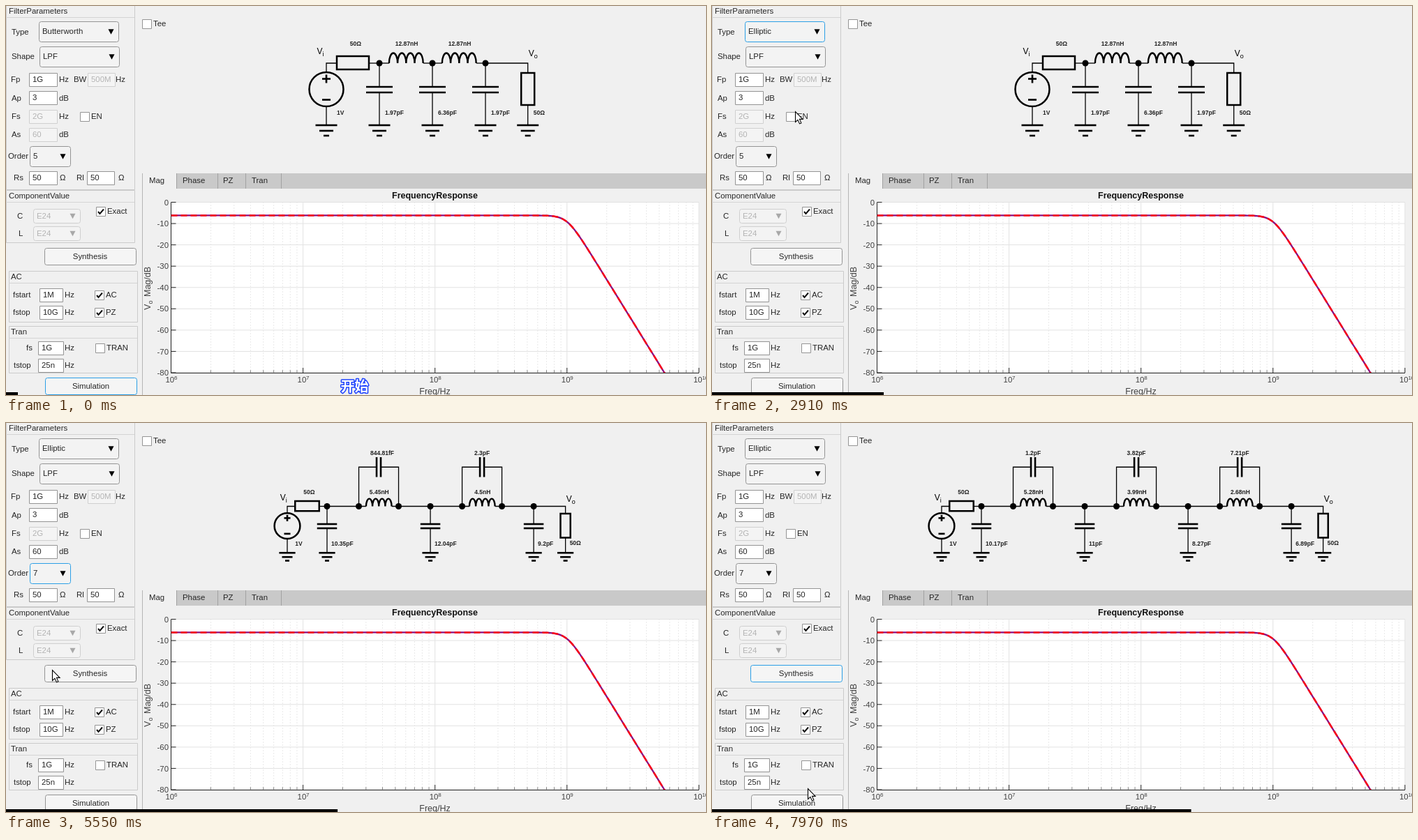
An HTML page with a canvas that plays this animation: 1003x558 px, repeating every 8000 ms.

```html
<!DOCTYPE html>
<html lang="en">
<head>
<meta charset="utf-8">
<title>Filter designer</title>
<style>
html, body { margin: 0; width: 1003px; height: 558px; overflow: hidden; background: #f0f0f0; }
canvas { display: block; }
</style>
</head>
<body>
<canvas id="stage" width="1003" height="558"></canvas>
<script>
const g = document.getElementById('stage').getContext('2d');
const SANS = '"Liberation Sans", Arial, sans-serif';
const INK = '#262626', DIM = '#b4b4b4', EDGE = '#949494', BLUE = '#2b9fe6', PICK = '#a6dbff';
const TYPES = ['Butterworth', 'Chebyshev I', 'Chebyshev II', 'Elliptic', 'Bessel', 'Gaussian', 'LinearPhase'];
const ORDERS = Array.from({ length: 15 }, (_, i) => String(i + 2));

// Pointer way points: step, x, y
const PATH = [[2, 130, 250], [5, 140, 40], [7, 135, 62], [10, 92, 129], [11, 98, 133], [12, 119, 151],
  [16, 85, 198], [19, 78, 214], [21, 67, 328], [24, 62, 352], [25, 66, 354], [29, 129, 365],
  [35, 132, 386], [37, 137, 524]];

function text(s, x, y, { size = 11.4, color = INK, align = 'left', bold = false } = {}) {
  g.font = `${bold ? 'bold ' : ''}${size}px ${SANS}`;
  g.fillStyle = color;
  g.textAlign = align;
  g.textBaseline = 'middle';
  g.fillText(s, x, y);
}

function line(color, width, ...pts) {
  g.strokeStyle = color;
  g.lineWidth = width;
  g.beginPath();
  for (let i = 0; i < pts.length; i += 2) g.lineTo(pts[i], pts[i + 1]);
  g.stroke();
}

function rect(x, y, w, h, fill) {
  g.fillStyle = fill;
  g.fillRect(x, y, w, h);
}

function box(x, y, w, h, { fill = '#fff', stroke = EDGE, radius = 0 } = {}) {
  g.beginPath();
  g.roundRect(x + .5, y + .5, w, h, radius);
  g.fillStyle = fill;
  g.fill();
  g.strokeStyle = stroke;
  g.lineWidth = 1;
  g.stroke();
}

function triangle(x, y, w, h, color) {
  g.fillStyle = color;
  g.beginPath();
  g.moveTo(x - w, y - h);
  g.lineTo(x + w, y - h);
  g.lineTo(x, y + h);
  g.fill();
}

function field(x, y, w, value, off) {
  box(x, y, w, 19, off ? { fill: '#f4f4f4', stroke: '#d0d0d0' } : {});
  text(value, x + 5, y + 10, { color: off ? DIM : INK });
}

function dropdown(x, y, w, h, value, { focus = false, off = false } = {}) {
  box(x, y, w, h, { fill: '#f3f3f3', stroke: off ? '#cfcfcf' : focus ? BLUE : EDGE, radius: 3 });
  text(value, x + 5, y + h / 2 + .5, { color: off ? DIM : INK });
  triangle(x + w - 10.5, y + h / 2 + .5, 4, 3.7, off ? '#a8a8a8' : '#000');
}

function check(x, y, label, on) {
  box(x, y, 13, 13);
  if (on) line('#111', 2, x + 3, y + 7, x + 5.5, y + 10, x + 11, y + 3.5);
  text(label, x + 16, y + 7);
}

function button(x, y, label, focus) {
  box(x, y, 131, 24, { fill: '#f5f5f5', stroke: focus ? BLUE : EDGE, radius: 3 });
  text(label, x + 65.5, y + 12.5, { align: 'center' });
}

function panel(title, x, y, w, h) {
  box(x, y, w, h, { fill: '#f0f0f0', stroke: '#cbcbcb' });
  line('#d4d4d4', 1, x, y + 17.5, x + w, y + 17.5);
  text(title, Math.max(4, x + 3), y + 9);
}

function list(items, x, y, w, h, selected, pointerY) {
  const row = 22.2, hover = Math.floor((pointerY - y - 1) / row);
  box(x, y, w, h, { fill: '#fafafa', stroke: '#a0a0a0' });
  items.forEach((item, i) => {
    const top = y + 1 + i * row;
    if (i === selected) rect(x + 1, top, w - 1, row, PICK);
    if (i === hover) {
      box(x, Math.round(top), w, row - 1, { fill: i === selected ? PICK : '#dbf0ff', stroke: BLUE });
    }
    text(item, x + 5, top + row / 2);
  });
}

function controls(s) {
  panel('FilterParameters', 0, -1, 184, 264);
  panel('ComponentValue', 0, 264, 184, 75);
  panel('AC', 4, 380, 184, 73);
  panel('Tran', 4, 459, 184, 67);
  [['Type', 8, 38], ['Shape', 8, 73], ['Fp', 7, 106], ['Hz', 76, 106], ['BW', 97, 106], ['Hz', 157, 106],
    ['Ap', 8, 133], ['dB', 76, 133], ['Fs', 8, 159], ['Hz', 76, 159], ['As', 8, 185], ['dB', 76, 185],
    ['Order', 3, 216], ['Rs', 11, 247], ['Ω', 77, 247], ['Rl', 101, 247], ['Ω', 161, 247],
    ['C', 16, 302], ['L', 18, 327], ['fstart', 10, 415], ['Hz', 84, 415], ['fstop', 10, 440], ['Hz', 84, 440],
    ['fs', 29, 491], ['Hz', 84, 491], ['tstop', 11, 516], ['Hz', 84, 516]].forEach(a => text(...a));
  dropdown(47, 22, 114, 29, s.type, { focus: s.focus === 'type' });
  dropdown(48, 58, 114, 29, 'LPF');
  dropdown(34, 201, 58, 29, s.order, { focus: s.focus === 'order' });
  dropdown(39, 291, 67, 20, 'E24', { off: true });
  dropdown(39, 316, 67, 20, 'E24', { off: true });
  field(33, 96, 40, '1G');
  field(117, 96, 39, '500M', true);
  field(33, 122, 40, '3');
  field(33, 149, 40, '2G', true);
  field(33, 175, 40, '60', !s.stopband);
  field(33, 237, 40, '50');
  field(116, 237, 39, '50');
  field(48, 405, 33, '1M');
  field(48, 430, 33, '10G');
  field(46, 481, 36, '1G');
  field(46, 506, 36, '25n');
  check(195, 19, 'Tee');
  check(106, 152, 'EN');
  check(129, 288, 'Exact', true);
  check(127, 408, 'AC', true);
  check(127, 433, 'PZ', true);
  check(128, 484, 'TRAN');
  button(55, 347, 'Synthesis', s.focus === 'synthesis');
  button(56, 533, 'Simulation', s.focus === 'simulation');
}

// Ladder filter; each stage is [inductor] or [inductor, parallel capacitor]
function circuit(x0, y0, k, shunts, stages) {
  const LEAD = 60.7, SPAN = 76;
  const X = u => x0 + u * k, Y = v => y0 + v * k;
  const wire = (...p) => stroke(1.3, ...p), bold = (...p) => stroke(2.6, ...p);
  const stroke = (w, ...p) => line('#000', w, ...p.map((v, i) => i % 2 ? Y(v) : X(v)));
  const label = (s, x, y, align = 'left') => text(s, x, y, { size: 8.5, bold: true, color: '#222', align });
  const resistor = (u, v, w, h) => {
    g.lineWidth = 2.5;
    g.strokeRect(X(u), Y(v), w * k, h * k);
  };
  const dot = u => {
    g.fillStyle = '#000';
    g.beginPath();
    g.arc(X(u), y0, 4.5, 0, 7);
    g.fill();
  };
  const ground = u => [[89, 15.5], [97, 10], [104, 4]].forEach(([v, w]) => bold(u - w, v, u + w, v));
  const terminal = (sub, x, y) => {
    text('V', x, y, { size: 12, color: '#000' });
    text(sub, x + 8, y + 4, { size: 9, color: '#000' });
  };
  const coil = u => {
    g.lineWidth = 2.4;
    g.beginPath();
    for (let i = 0; i < 4; i++) g.ellipse(X(u + 6 + 12.2 * i), y0, 6.1 * k, 14.5 * k, 0, Math.PI, 2 * Math.PI);
    g.stroke();
  };

  wire(0, 12, 0, 0, 15, 0);
  wire(61, 0, 76, 0);
  resistor(15, -10, 46, 19);
  g.beginPath();
  g.arc(x0, Y(37.5), 24.5 * k, 0, 7);
  g.stroke();
  bold(-6, 22.5, 6, 22.5);
  bold(0, 16.5, 0, 28.5);
  bold(-6, 52.5, 6, 52.5);
  wire(0, 62, 0, 89);
  ground(0);
  label('1V', X(15), Y(72));
  label('50Ω', X(42), Y(-27), 'center');
  terminal('i', X(-13) - .5, Y(-16));

  let u = 76;
  shunts.forEach((value, i) => {
    dot(u);
    wire(u, 0, u, 34);
    wire(u, 42, u, 89);
    bold(u - 19, 34, u + 19, 34);
    bold(u - 19, 42, u + 19, 42);
    ground(u);
    label(value, X(u + 8), Y(72));
    const stage = stages[i];
    if (!stage) return;
    const lead = stage[1] ? LEAD : 0, a = u + lead, b = a + SPAN;
    wire(u, 0, a + 14, 0);
    coil(a + 14);
    wire(b - 13, 0, b + lead, 0);
    label(stage[0], X(a + 39), Y(-27), 'center');
    if (stage[1]) {
      const mid = (a + b) / 2;
      dot(a);
      dot(b);
      wire(a, 0, a, -75, mid - 4, -75);
      wire(mid + 4, -75, b, -75, b, 0);
      bold(mid - 4, -94, mid - 4, -56);
      bold(mid + 4, -94, mid + 4, -56);
      label(stage[1], X(mid) + (stage[1].length > 7 ? 5 : 0), Y(-101.5), 'center');
    }
    u = b + lead;
  });

  const end = u + LEAD;
  wire(u, 0, end, 0, end, 14);
  resistor(end - 9.5, 14, 19, 46);
  wire(end, 60, end, 89);
  ground(end);
  label('50Ω', X(end + 8), Y(71.5));
  terminal('o', X(end) + 1, Y(-13));
}

function plot() {
  rect(195, 240, 808, 22, '#c9c9c9');
  rect(196, 240, 48, 23, '#f0f0f0');
  line('#b5b5b5', 1, 195.5, 240, 195.5, 558);
  [244, 303, 343, 394].forEach(x => line('#a2a2a2', 1, x + .5, 240, x + .5, 262));
  [['Mag', 205], ['Phase', 253], ['PZ', 311], ['Tran', 352]].forEach(([s, x]) => text(s, x, 251));

  const L = 236.5, R = 993, T = 281.5, B = 526, DEC = 189.1, DB = (B - T) / 80;
  rect(L, T, R - L, B - T, '#fff');
  for (let d = 0; d < 4; d++) {
    for (let m = 2; m < 10; m++) {
      const x = L + DEC * (d + Math.log10(m));
      g.setLineDash([1, 3]);
      line('#d2d2d2', 1, x, T, x, B);
      g.setLineDash([]);
      line('#707070', 1, x, B, x, B - 3.5);
    }
  }
  for (let i = 0; i <= 8; i++) {
    const y = T + 10 * DB * i;
    line('#e2e2e2', 1, L, y, R, y);
    line(INK, 1, L, y, L + 7, y);
    text(i ? String(-10 * i) : '0', 233, y + 1, { align: 'right', color: '#404040' });
  }
  for (let d = 0; d <= 4; d++) {
    const x = L + DEC * d;
    line('#e2e2e2', 1, x, T, x, B);
    line(INK, 1, x, B, x, B - 7);
    text('10', x - 8, 537, { color: '#404040' });
    text(String(d + 6), x + 4.5, 533.5, { size: 8, color: '#404040' });
  }
  line(INK, 1, L, T, L, B + .5, R, B + .5);

  const curve = [];
  for (let x = L; x <= R; x += 2) {
    const ratio = 10 ** ((x - L) / DEC - 3);
    curve.push(x, T + .5 + DB * (6.02 + 10 * Math.log10(1 + ratio ** 10)));
  }
  g.save();
  g.beginPath();
  g.rect(L, T, R - L, B - T);
  g.clip();
  line('#8a0c80', 2.3, ...curve);
  g.setLineDash([9, 5]);
  line('#f80018', 2.5, ...curve);
  g.restore();

  text('FrequencyResponse', 614.5, 272.7, { size: 12.5, bold: true, align: 'center', color: '#111' });
  text('Freq/Hz', 614.5, 554, { size: 12.5, align: 'center', color: '#404040' });
  g.save();
  g.translate(204, 436);
  g.rotate(-Math.PI / 2);
  text('V', 0, 0, { size: 12.5, color: '#404040' });
  text('o', 8.5, 4, { size: 9, color: '#404040' });
  text('Mag/dB', 19, 0, { size: 12.5, color: '#404040' });
  g.restore();
}

function caption() {
  g.font = `bold 20px "Noto Sans CJK SC", "Noto Sans CJK", sans-serif`;
  g.textAlign = 'center';
  g.textBaseline = 'middle';
  g.lineJoin = 'round';
  g.strokeStyle = '#1d42ff';
  g.lineWidth = 3;
  g.strokeText('开始', 499.5, 545.5);
  g.fillStyle = '#fff';
  g.fillText('开始', 499.5, 545.5);
  g.lineJoin = 'miter';
}

function pointerAt(step) {
  const i = PATH.findIndex(p => p[0] >= step);
  if (step < PATH[0][0] || i < 0) return null;
  const b = PATH[i], a = PATH[i - 1] || b, f = a === b ? 0 : (step - a[0]) / (b[0] - a[0]);
  return [a[1] + (b[1] - a[1]) * f, a[2] + (b[2] - a[2]) * f];
}

function pointer([x, y]) {
  const arrow = new Path2D('M0 0V15L3.4 11.8 6 17.4 8.4 16.4 6 10.9H10.6Z');
  g.save();
  g.translate(Math.round(x) + .5, Math.round(y) + .5);
  g.fillStyle = '#fff';
  g.strokeStyle = '#000';
  g.lineWidth = 1.1;
  g.fill(arrow);
  g.stroke(arrow);
  g.restore();
}

const stepTime = k => 500 + 200 * k + (k >= 5 ? 10 : 0) + 20 * ((k >= 15) + (k >= 20) + (k >= 30));

function draw(step) {
  const at = pointerAt(step);
  rect(0, 0, 1003, 558, '#f0f0f0');
  controls({
    type: step < 11 ? 'Butterworth' : 'Elliptic',
    order: step < 25 ? '5' : '7',
    stopband: step >= 13,
    focus: step < 5 ? 'simulation' : step < 19 ? 'type' : step < 31 ? 'order' : 'synthesis'
  });
  plot();
  if (step < 14) {
    circuit(459, 82, 1, ['1.97pF', '6.36pF', '1.97pF'], [['12.87nH'], ['12.87nH']]);
  } else if (step < 33) {
    circuit(403, 119.5, .75, ['10.35pF', '12.04pF', '9.2pF'], [['5.45nH', '844.81fF'], ['4.5nH', '2.3pF']]);
  } else {
    circuit(329, 119.5, .75, ['10.17pF', '11pF', '8.27pF', '6.89pF'],
      [['5.28nH', '1.2pF'], ['3.99nH', '3.82pF'], ['2.68nH', '7.21pF']]);
  }
  if (step >= 6 && step < 11) list(TYPES, 48, 52, 113, 157, 0, at[1]);
  if (step >= 19 && step < 25) {
    list(ORDERS, 34, 231, 74, 340, 3, at[1]);
    rect(92, 232, 16, 326, '#f0f0f0');
    rect(93, 248, 13, 231, '#c1c1c1');
    triangle(99.5, 240, 4, -2.5, '#a0a0a0');
    triangle(99.5, 552.5, 4, 2.5, '#404040');
  }
  if (step < 3) caption();
  rect(0, 554, 17 + 17.62 * (step + 1), 4, '#000');
  if (at) pointer(at);
}

let shown = null;
function tick() {
  const t = performance.now() % 8000;
  let step = -1;
  while (stepTime(step + 1) <= t) step++;
  if (step !== shown) draw(shown = step);
  requestAnimationFrame(tick);
}
tick();
</script>
</body>
</html>
```
